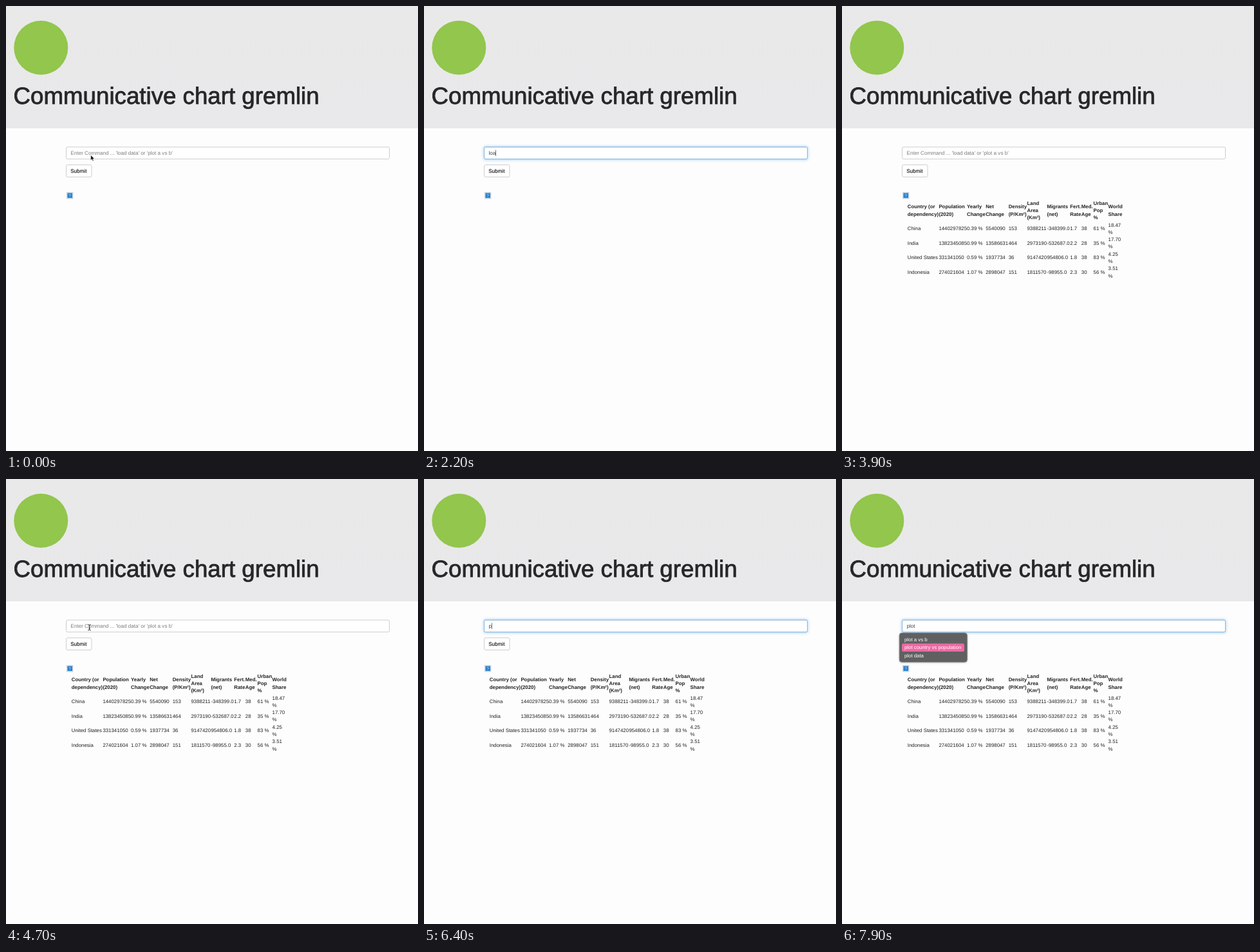
Animation of 640x691 px, one loop 8000 ms. Source, as an HTML page:

```html
<!DOCTYPE html>
<html lang="en">
<head>
<meta charset="utf-8">
<title>Table assistant</title>
<style>
  html, body { margin: 0; width: 100%; height: 100%; overflow: hidden; background: #fdfdfe; }
  svg { display: block; width: 100%; height: 100%; }
  text { font-family: "Liberation Sans", Arial, sans-serif; white-space: pre; text-rendering: geometricPrecision; }
  .title { font-size: 36.7px; fill: #272729; stroke: #272729; stroke-width: .85px; }
  .field { font-size: 8.1px; }
  .cell { font-size: 7.85px; fill: #222; }
  .head { font-weight: bold; }
  .menu { font-size: 7.8px; fill: #fff; }
</style>
</head>
<body>
<svg viewBox="0 0 640 691" preserveAspectRatio="none">
  <defs>
    <linearGradient id="band" x2="0" y2="1">
      <stop stop-color="#e9e9e9"/><stop offset="1" stop-color="#e9e8ea"/>
    </linearGradient>
    <filter id="glow" x="-5%" y="-80%" width="110%" height="260%"><feGaussianBlur stdDeviation="2"/></filter>
    <filter id="shade" x="-10%" y="-20%" width="120%" height="140%"><feGaussianBlur stdDeviation="1.5"/></filter>
    <path id="ibeam" d="M-2-4.4Q0-4.4 0-3.4Q0-4.4 2-4.4M0-3.4V3.4M-2 4.4Q0 4.4 0 3.4Q0 4.4 2 4.4M-1 1.4H1"/>
  </defs>
  <rect width="640" height="691" fill="#fdfdfe"/>
  <rect width="640" height="190" fill="url(#band)"/>
  <circle cx="54.3" cy="64.8" r="42" fill="#92c64d"/>
  <text class="title" x="11.6" y="151.7">Communicative chart gremlin</text>

  <rect id="halo" x="92.5" y="218" width="504" height="21" rx="3" fill="#66afe9" filter="url(#glow)"/>
  <rect x="93.5" y="219" width="502" height="18.6" rx="2" fill="#fff" stroke="#c8c8ca" stroke-width=".9"/>
  <rect id="focus" x="93.5" y="219" width="502" height="18.6" rx="2" fill="none" stroke="#80b7e4" stroke-width=".9"/>
  <text id="entry" class="field" x="100.5" y="231.1"></text>
  <rect id="caret" y="223.6" width=".7" height="9.4" fill="#333"/>

  <rect x="93.5" y="246.7" width="39.5" height="18.8" rx="2" fill="#fff" stroke="#c8c8ca" stroke-width=".9"/>
  <text class="field" x="100.2" y="258.9" font-size="8.2" fill="#111" stroke="#111" stroke-width=".12">Submit</text>

  <rect x="94" y="289" width="10.4" height="10.6" fill="#c9d6e1"/>
  <rect x="95.5" y="290.6" width="7.4" height="7.4" fill="#2580cf"/>
  <text x="99.2" y="296.8" font-size="6.6" fill="#d8ecff" text-anchor="middle">?</text>

  <g id="table"></g>
  <g id="menu">
    <rect x="89" y="240" width="105.5" height="45" rx="4" fill="#000" opacity=".35" filter="url(#shade)"/>
    <rect x="89.2" y="239" width="105.2" height="45.3" rx="4" fill="#606061" stroke="#777" stroke-width=".6"/>
    <rect id="pick" x="93" width="97" height="12.5" rx="2.6" fill="#ed69a3"/>
  </g>
  <path id="arrow" d="M0 0V8.2L1.9 6.5L3.2 9.4L4.6 8.8L3.4 5.9H5.9Z" fill="#111" stroke="#fff" stroke-width=".6"/>
  <g id="beam" fill="none" stroke-linecap="round">
    <use href="#ibeam" stroke="#fff" stroke-width="1.7" opacity=".6"/>
    <use href="#ibeam" stroke="#222" stroke-width=".9"/>
  </g>
</svg>
<script>
const LOOP = 8000, STEP = 100, LEFT = 100.5;
const HINT = "Enter Command ... 'load data' or 'plot a vs b'";
const $ = id => document.getElementById(id);
const set = (id, attrs) => {
  for (const k in attrs) $(id).setAttribute(k, attrs[k]);
};
const show = (id, on) => set(id, { visibility: on ? "visible" : "hidden" });

function label(parent, cls, x, y, str) {
  const el = document.createElementNS("http://www.w3.org/2000/svg", "text");
  el.setAttribute("class", cls);
  el.setAttribute("x", x);
  el.setAttribute("y", y);
  el.textContent = str;
  $(parent).append(el);
}

const columns = [101.8, 150.4, 194, 223.2, 258.7, 287.5, 318.4, 354.3, 371.8, 390.6, 413.6];
const heads = ["Country (or|dependency)", "Population|(2020)", "Yearly|Change", "Net|Change", "Density|(P/Km²)",
  "Land|Area|(Km²)", "Migrants|(net)", "Fert.|Rate", "Med.|Age", "Urban|Pop|%", "World|Share"];
const rows = [
  "China;1440297825;0.39 %;5540090;153;9388211;-348399.0;1.7;38;61 %;18.47|%",
  "India;1382345085;0.99 %;13586631;464;2973190;-532687.0;2.2;28;35 %;17.70|%",
  "United States;331341050;0.59 %;1937734;36;9147420;954806.0;1.8;38;83 %;4.25|%",
  "Indonesia;274021604;1.07 %;2898047;151;1811570;-98955.0;2.3;30;56 %;3.51|%"
];

// Lines of a cell are stacked around its middle baseline
function tableRow(cells, y, cls) {
  cells.forEach((cell, i) => {
    const lines = cell.split("|");
    lines.forEach((s, n) => label("table", cls, columns[i], y + (n - (lines.length - 1) / 2) * 11.3, s));
  });
}
tableRow(heads, 320.1, "cell head");
rows.forEach((r, i) => tableRow(r.split(";"), 348.2 + i * 22.6, "cell"));

["plot a vs b", "plot country vs population", "plot data"]
  .forEach((s, i) => label("menu", "menu", 97, 251.9 + i * 12.4, s));

// [start, text]
const typing = [[0, ""], [1700, "l"], [2000, "lo"], [2200, "loa"], [2400, "load"], [2700, "load "],
  [3200, "load da"], [3500, "load data"], [3900, ""], [6300, "p"], [6500, "pl"], [6700, "plo"],
  [6800, "plot"], [7000, "plot "]];

// [start, shape, x, y]
const pointer = [[0, "arrow", 131.6, 231.4], [100, "beam", 133.5, 231], [200, "beam", 132, 230.8],
  [600, "beam", 130, 230.5], [700, "beam", 128, 230.4], [800, "beam", 127, 230.4], [1700, ""],
  [4700, "beam", 129.6, 230.5], [4800, "beam", 126, 230], [4900, "beam", 122.5, 229], [5000, "beam", 121, 228.2],
  [5200, "beam", 120.7, 224], [5300, "beam", 120.5, 221.5], [5500, "beam", 120.8, 226], [5600, "beam", 121, 228.2],
  [6300, ""]];

const caretOn = [[900, 1400], [1700, 3900], [5500, 6000], [6300, 7500]];

const at = (list, t) => list.filter(k => k[0] <= t).pop();
const ramp = (t, from, len) => Math.min(1, Math.max(0, (t - from) / len));
const ruler = document.createElement("canvas").getContext("2d");
ruler.font = '81px "Liberation Sans", Arial, sans-serif';
const width = s => ruler.measureText(s).width / 10;

function draw(time) {
  const t = Math.floor(time % LOOP / STEP) * STEP;
  const text = at(typing, t)[1];
  $("entry").textContent = text || HINT;
  set("entry", { fill: text ? "#444" : "#7c7c7c" });

  const focus = t < 3900 ? ramp(t, 780, 200) : ramp(t, 5450, 200);
  set("halo", { opacity: focus * .55 });
  set("focus", { opacity: focus });
  set("caret", { x: LEFT + width(text) - .1 });
  show("caret", caretOn.some(([a, b]) => t >= a && t < b));

  show("table", t >= 3900);
  show("menu", t >= 7500);
  show("pick", t >= 7700);
  set("pick", { y: t < 7800 ? 243.1 : 255.5 });

  const [, shape, x, y] = at(pointer, t);
  for (const id of ["arrow", "beam"]) show(id, id === shape);
  if (shape) set(shape, { transform: `translate(${x} ${y})` });
}

const start = performance.now();
function tick() {
  draw(performance.now() - start);
  requestAnimationFrame(tick);
}
tick();
</script>
</body>
</html>
```
